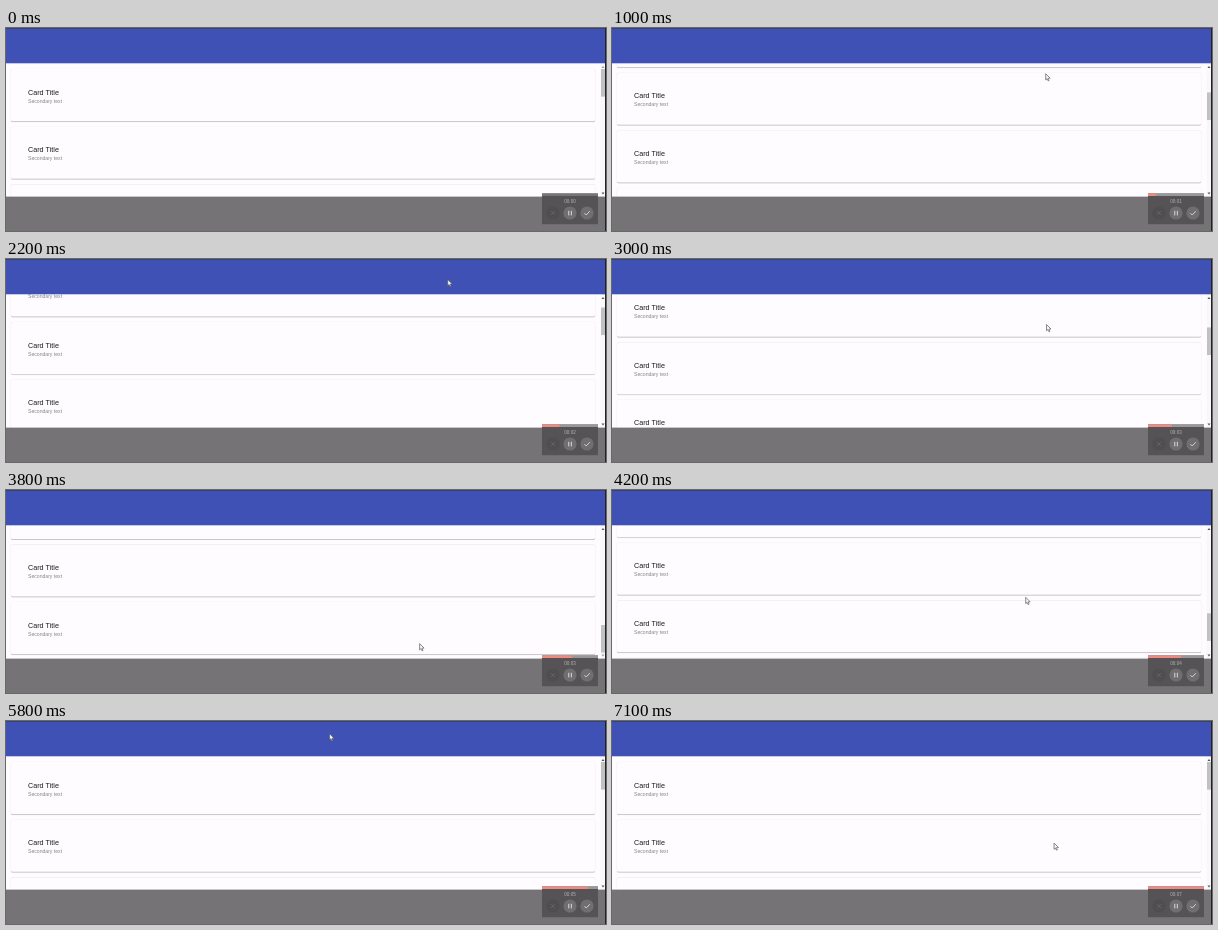
Recreate the animation shown at these times as an HTML page with a canvas. Size 600 by 203 pixels, loop 7.2 s.

```html
<!DOCTYPE html>
<html lang="en">
<head>
<meta charset="utf-8">
<title>Scrolling cards</title>
<style>
  html, body { margin: 0; width: 100%; height: 100%; overflow: hidden; background: #757375; }
  canvas { display: block; }
</style>
</head>
<body>
<canvas id="stage" width="600" height="203"></canvas>
<script>
const ctx = document.getElementById('stage').getContext('2d');
const LOOP = 7200, STEP = 100;
const VIEW = { top: 35.3, bottom: 168.6 };
const CARD = { x: 5, y: 41, w: 584, h: 52.2, pitch: 57.6, count: 10 };
const MAX_SCROLL = 447.4;
const FONT = '"Liberation Sans", Arial, sans-serif';
const PAPER = '#fefcff';

// Resting points of the pointer: time in ms, x, y.
const pointerStops = [
  [100, 520, 193], [1000, 433.7, 45.7], [2200, 441.7, 20.5],
  [3000, 434.5, 65.5], [3800, 413.6, 153.6], [4700, 413.8, 42.6],
  [5300, 398, 18.5], [6100, 289, 10], [7100, 442, 122]
];

const clamp = (v, lo, hi) => Math.min(hi, Math.max(lo, v));

// One sweep down the page and back up.
function swing(t, start, duration, height) {
  return height * Math.sin(Math.PI * clamp((t - start) / duration, 0, 1));
}

function scrollAt(t) {
  return Math.min(MAX_SCROLL, swing(t, 130, 2290, 120) + swing(t, 2827, 1972, 480));
}

function pointerAt(t) {
  const next = Math.max(1, pointerStops.findIndex(([time]) => time >= t));
  const [t0, x0, y0] = pointerStops[next - 1];
  const [t1, x1, y1] = pointerStops[next];
  const u = clamp((t - t0) / (t1 - t0), 0, 1);
  const ease = u * u * (3 - 2 * u);
  return [x0 + (x1 - x0) * ease, y0 + (y1 - y0) * ease];
}

function rect(x, y, w, h, color) {
  ctx.fillStyle = color;
  ctx.fillRect(x, y, w, h);
}

function roundRect(x, y, w, h, r, color) {
  ctx.fillStyle = color;
  ctx.beginPath();
  ctx.roundRect(x, y, w, h, r);
  ctx.fill();
}

function disc(x, y, r, color) {
  ctx.fillStyle = color;
  ctx.beginPath();
  ctx.arc(x, y, r, 0, Math.PI * 2);
  ctx.fill();
}

function trace(points) {
  ctx.beginPath();
  points.forEach(([x, y]) => ctx.lineTo(x, y));
}

function polygon(points, color) {
  trace(points);
  ctx.fillStyle = color;
  ctx.fill();
}

function line(points, color, width) {
  trace(points);
  ctx.strokeStyle = color;
  ctx.lineWidth = width;
  ctx.stroke();
}

function text(str, x, y, size, color, align = 'left') {
  ctx.font = `${size}px ${FONT}`;
  ctx.textAlign = align;
  ctx.fillStyle = color;
  ctx.fillText(str, x, y);
}

function drawCard(y) {
  const { x, w, h } = CARD;
  roundRect(x - 0.4, y - 0.2, w + 0.8, h + 1.2, 1.8, 'rgba(0,0,0,0.06)');
  roundRect(x, y + 0.4, w, h + 0.3, 1.5, 'rgba(0,0,0,0.22)');
  roundRect(x, y, w, h, 1.5, PAPER);
  text('Card Title', 22, y + 25.7, 7.2, '#1c1c1c');
  text('Secondary text', 22, y + 33.8, 5.12, '#858585');
}

function drawArrow(y, direction, active) {
  polygon([[595.5, y], [598.5, y], [597, y + 2 * direction]], active ? '#555' : '#999');
}

function drawScrollbar(scroll) {
  rect(594.5, VIEW.top, 4.5, VIEW.bottom - VIEW.top, '#f9f7fa');
  rect(595, 41 + scroll * 94 / MAX_SCROLL, 4, 27.6, '#c1c0c2');
  drawArrow(40, -1, scroll > 0);
  drawArrow(164.5, 1, scroll < MAX_SCROLL);
}

function drawPage(scroll) {
  rect(0, 0, 600, 203, PAPER);
  for (let i = 0; i < CARD.count; i++) drawCard(CARD.y + i * CARD.pitch - scroll);
  drawScrollbar(scroll);
  rect(0, 0, 600, VIEW.top, '#3f51b5');
  rect(0, 0, 600, 1, '#3a4270');
  rect(0, VIEW.bottom, 600, 203 - VIEW.bottom, '#757375');
  rect(599, 0, 1, 203, '#222224');
}

function drawRecorder(t) {
  const icon = '#d2d0d2', cross = '#676567';
  rect(536, 165.5, 56, 30.7, '#555355');
  rect(536, 165.5, 56, 2.5, t > 0 ? '#999799' : '#777577');
  rect(536, 165.5, 56 * Math.min(1, t / 7050), 2.5, '#ee8a80');
  text('00:0' + Math.floor(t / 1000), 564, 175, 4.5, '#b8b6b8', 'center');

  disc(547, 185, 6.6, '#504e50');
  line([[545, 183], [549, 187]], cross, 0.8);
  line([[549, 183], [545, 187]], cross, 0.8);

  disc(564, 185, 6.6, '#706e70');
  for (const x of [562.2, 564.8]) rect(x, 182.8, 1.1, 4.6, icon);

  disc(581, 185, 6.6, '#706e70');
  line([[578.4, 185.2], [580.2, 187], [583.8, 183.2]], icon, 1);
}

function drawPointer([x, y]) {
  const shape = [[0, 0], [0, 6.3], [1.4, 5], [2.4, 7.2], [3.4, 6.8], [2.5, 4.6], [4.5, 4.5], [0, 0]];
  const points = shape.map(([dx, dy]) => [x + dx, y + dy]);
  polygon(points, '#f4f2f5');
  line(points, '#555', 0.65);
}

function draw(now) {
  const t = Math.floor(now % LOOP / STEP) * STEP;
  drawPage(scrollAt(t));
  drawRecorder(t);
  if (t > 0) drawPointer(pointerAt(t));
}

const start = performance.now();
function tick() {
  draw(performance.now() - start);
  requestAnimationFrame(tick);
}
tick();
</script>
</body>
</html>
```
